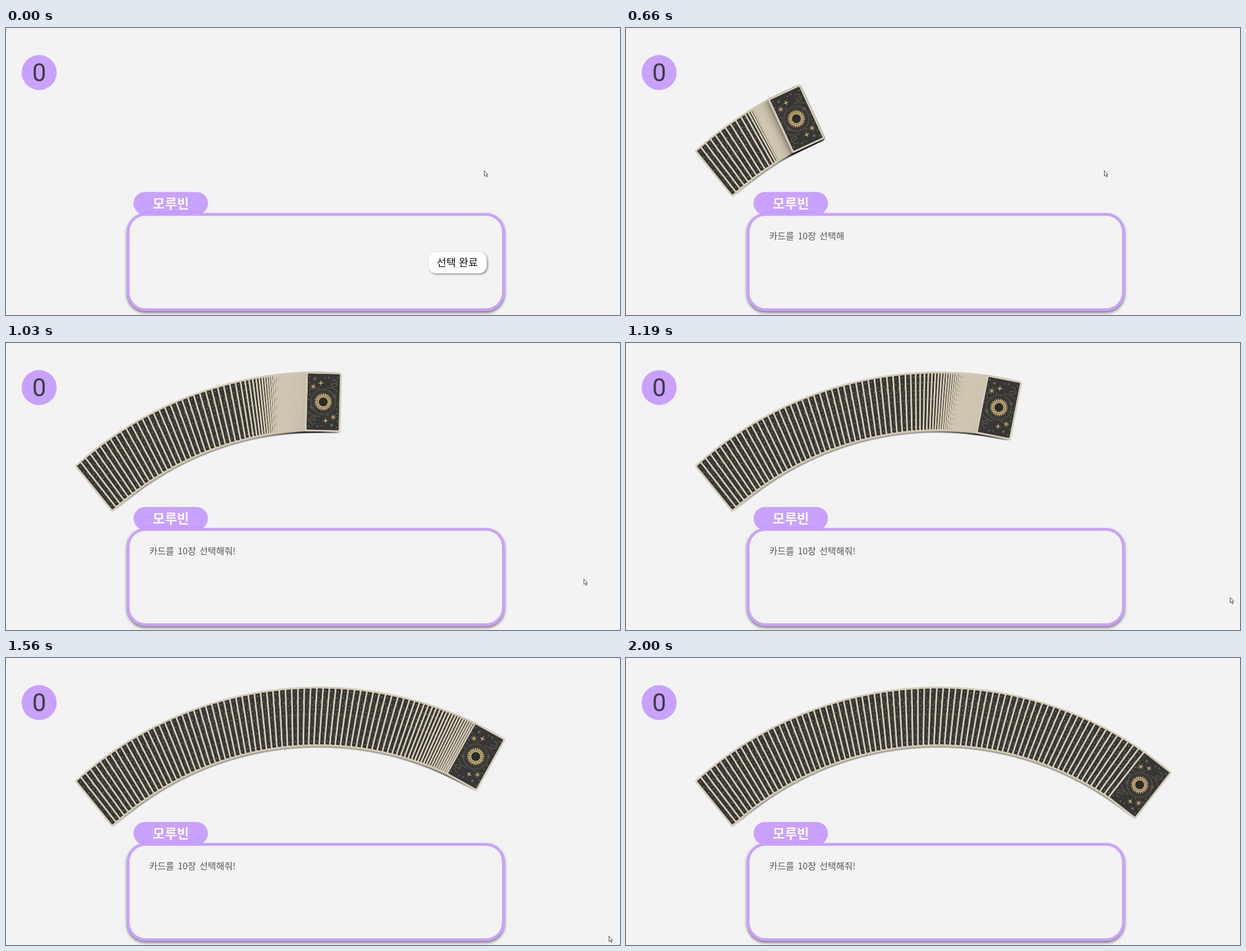
An HTML page with a canvas that plays this animation: 1093x512 px, repeating every 2.73 s.

```html
<!DOCTYPE html>
<html lang="ko">
<head>
<meta charset="utf-8">
<title>카드 펼치기</title>
<style>
  html, body { margin: 0; width: 100%; height: 100%; overflow: hidden; background: #f3f3f3; }
  svg, canvas { position: absolute; left: 0; top: 0; display: block; }
  text { font-family: "Noto Sans CJK KR", "Noto Sans CJK", "Noto Sans KR", sans-serif; white-space: pre; }
  .lilac { fill: #c9a1ff; }
  .count { font-family: Roboto, sans-serif; font-size: 44px; fill: #3e3e3e; text-anchor: middle; }
  .name { font-size: 23.5px; font-weight: 900; fill: #fff; text-anchor: middle; }
  .panel { fill: #f3f3f3; stroke: #c9a1ff; stroke-width: 5; filter: drop-shadow(0 3px 2.5px rgba(0,0,0,.5)); }
  .speech { font-size: 16px; font-weight: 300; word-spacing: 2px; fill: #555; }
  .button rect { fill: #fff; stroke: #e6e6e6; filter: drop-shadow(2.5px 2.5px 1.5px rgba(0,0,0,.35)); }
  .button text { font-size: 18.5px; font-weight: 300; fill: #111; text-anchor: middle; }
</style>
</head>
<body>
<svg width="1093" height="512" viewBox="0 0 1093 512">
  <circle class="lilac" cx="59" cy="79.5" r="31.2"/>
  <text class="count" x="59" y="94.5">0</text>
  <rect class="lilac" x="227" y="292.5" width="132.5" height="41" rx="20.5"/>
  <rect class="panel" x="217.5" y="332.5" width="668" height="170" rx="31"/>
  <text class="name" x="293.5" y="321.5">모루빈</text>
  <text class="speech" id="speech" x="255" y="377"></text>
  <g class="button" id="button">
    <rect x="752" y="399" width="103.5" height="38.5" rx="13"/>
    <text x="803.5" y="424.8">선택 완료</text>
  </g>
</svg>
<canvas id="table" width="1093" height="512"></canvas>
<svg width="1093" height="512" viewBox="0 0 1093 512">
  <path id="pointer" d="M.5 .5V10.2L2.7 8.2 4.4 11.8 5.8 11.1 4.2 7.7H7Z" fill="#fff" stroke="#333" stroke-width=".9"/>
</svg>
<script>
const LOOP = 2730;
const CLICK = 170;
const SLIDE = 290;
const FAN_START = 487;
const FAN_TIME = 1500;
const CARDS = 78;
const HUB = { x: 556, y: 695, radius: 590 };
const FIRST_ANGLE = -39;
const LAG = -0.6;          // card centres sit slightly behind their tilt
const CARD = { w: 63, h: 106 };
const MESSAGE = '카드를 10장 선택해줘!';
const TYPING = { start: 130, step: 48 };
const POINTER = [
  [670, 851, 254], [840, 924.5, 316.5], [950, 951, 366], [1080, 1075, 453.5],
  [1220, 1075, 453.5], [1420, 1073.5, 484], [1730, 1072, 509.5], [1770, 1072, 514]
];

const table = document.getElementById('table').getContext('2d');
const speech = document.getElementById('speech');
const button = document.getElementById('button');
const pointer = document.getElementById('pointer');
const rad = deg => deg * Math.PI / 180;
const clamp = v => Math.min(1, Math.max(0, v));

// cubic-bezier(0, 0, .58, 1)
function easeOut(x) {
  if (x <= 0) return 0;
  if (x >= 1) return 1;
  let low = 0, high = 1;
  for (let k = 0; k < 18; k++) {
    const s = (low + high) / 2;
    if (1.74 * s * s - 0.74 * s ** 3 < x) low = s; else high = s;
  }
  return 3 * low * low - 2 * low ** 3;
}

function star(g, x, y, points, outer, inner, color) {
  g.beginPath();
  for (let k = 0; k < points * 2; k++) {
    const r = k % 2 ? inner : outer, a = k * Math.PI / points;
    g.lineTo(x + r * Math.sin(a), y - r * Math.cos(a));
  }
  g.closePath();
  g.fillStyle = color;
  g.fill();
}

function ring(g, r, width, color, dash = []) {
  g.beginPath();
  g.arc(0, 0, r, 0, 7);
  g.setLineDash(dash);
  g.lineWidth = width;
  g.strokeStyle = color;
  g.stroke();
  g.setLineDash([]);
}

function halfPattern(g) {
  const gold = '#c8ab72', dim = '#80765f';
  star(g, -18.4, -26.8, 8, 7.5, 1.5, gold);
  star(g, -5, -33.5, 4, 5.5, 1.6, gold);
  star(g, -16, -41, 8, 4, 1.2, dim);
  star(g, 20.2, -10.5, 4, 5, 0.6, gold);
  star(g, -24, -13, 4, 2.5, 0.6, dim);
  star(g, 9, -44, 4, 3, 0.7, dim);
  for (const [x, y] of [[-25, -45], [-26, -34], [-25, -20], [-26, -4], [25, -44], [2, -43], [-9, -24]]) {
    star(g, x, y, 4, 1.2, 0.6, gold);
  }
  g.beginPath();
  g.moveTo(14, -40);
  g.bezierCurveTo(27, -41, 24, -30, 15, -33);
  g.bezierCurveTo(10, -26, 23, -24, 25, -34);
  g.moveTo(5, -26);
  g.quadraticCurveTo(19, -26, 26, -18);
  g.lineWidth = 0.8;
  g.strokeStyle = dim;
  g.stroke();
}

function makeCard() {
  const scale = 2, pad = 6;
  const sprite = document.createElement('canvas');
  sprite.width = (CARD.w + pad * 2) * scale;
  sprite.height = (CARD.h + pad * 2) * scale;
  const g = sprite.getContext('2d');
  g.scale(scale, scale);
  g.translate(CARD.w / 2 + pad, CARD.h / 2 + pad);
  const panel = (inset, radius, color) => {
    g.beginPath();
    g.roundRect(inset - CARD.w / 2, inset - CARD.h / 2, CARD.w - inset * 2, CARD.h - inset * 2, radius);
    g.fillStyle = color;
    g.fill();
  };
  g.shadowColor = 'rgba(0,0,0,.12)';
  g.shadowBlur = 2.5 * scale;
  g.shadowOffsetY = 1.2 * scale;
  panel(0, 3, '#d5cbb5');
  g.shadowColor = 'transparent';
  panel(3, 1.5, '#363635');

  halfPattern(g);
  g.rotate(Math.PI);
  halfPattern(g);
  ring(g, 22.5, 1.3, '#5d574a');
  ring(g, 20, 0.7, '#71684f', [1, 1.2]);
  star(g, 0, 0, 24, 17, 12, '#cbb078');
  ring(g, 10.6, 0.7, '#4a4436');
  g.beginPath();
  g.arc(0, 0, 8, 0, 7);
  g.fillStyle = '#2b2b2b';
  g.fill();
  return sprite;
}

const cardSprite = makeCard();
table.imageSmoothingQuality = 'high';

function drawCards(t) {
  table.clearRect(0, 0, 1093, 512);
  if (t < CLICK) return;
  const away = 1 - easeOut((t - CLICK) / SLIDE);
  const w = cardSprite.width / 2, h = cardSprite.height / 2;
  for (let i = 0; i < CARDS; i++) {
    const share = i / (CARDS - 1);
    const turn = i ? i * easeOut((t - FAN_START) / (FAN_TIME * share)) : 0;
    const tilt = FIRST_ANGLE + turn, spot = rad(tilt + LAG);
    table.save();
    table.translate(
      HUB.x + HUB.radius * Math.sin(spot) - 240 * away,
      HUB.y - HUB.radius * Math.cos(spot) - 117 * away
    );
    table.rotate(rad(tilt));
    table.drawImage(cardSprite, -w / 2, -h / 2, w, h);
    table.restore();
  }
}

function pointerAt(t) {
  let [, x, y] = POINTER[0];
  for (let k = 1; k < POINTER.length; k++) {
    const [t0, x0, y0] = POINTER[k - 1], [t1, x1, y1] = POINTER[k];
    if (t < t0) break;
    const p = clamp((t - t0) / (t1 - t0));
    x = x0 + (x1 - x0) * p;
    y = y0 + (y1 - y0) * p;
  }
  return [x, y];
}

function render(t) {
  const typed = t < CLICK ? 0 : Math.floor((t - TYPING.start) / TYPING.step);
  speech.textContent = MESSAGE.slice(0, typed);
  button.style.display = t < CLICK ? '' : 'none';
  pointer.setAttribute('transform', `translate(${pointerAt(t)})`);
  drawCards(t);
}

const start = performance.now();
function tick() {
  render((performance.now() - start) % LOOP);
  requestAnimationFrame(tick);
}
tick();
</script>
</body>
</html>
```
